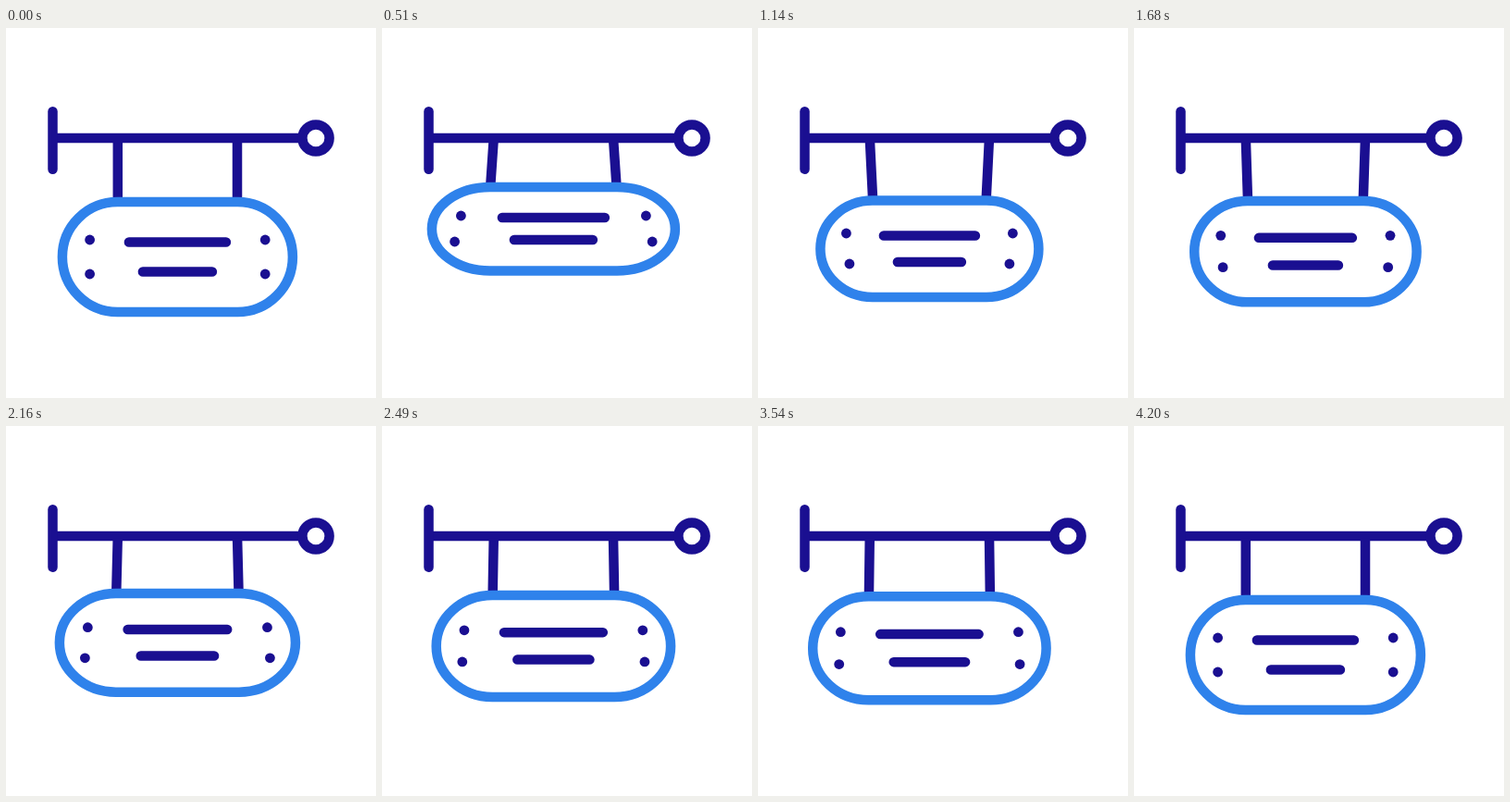
Write an HTML page that moves like this. It is 400 px wide and 400 px high and loops after 4.73 s.

```html
<!DOCTYPE html>
<html lang="en">
<head>
<meta charset="utf-8">
<title>Swinging sign</title>
<style>
  html, body { margin: 0; width: 100%; height: 100%; overflow: hidden; background: #fff; }
  svg { display: block; width: 100vw; height: 100vh; }
  .line { fill: none; stroke: #1a0f91; stroke-width: 10.5; }
  .round { stroke-linecap: round; }
  .dot { fill: #1a0f91; }
  .board { fill: none; stroke: #2f82eb; stroke-width: 10.5; }
</style>
</head>
<body>
<svg viewBox="0 0 400 400">
  <path id="hangers" class="line"/>
  <path class="line" d="M50.5 119H320"/>
  <path class="line round" d="M50.5 90.3V152.7"/>
  <circle class="line" cx="335" cy="119" r="14.6"/>
  <rect id="board" class="board"/>
  <path id="bars" class="line round"/>
  <g id="dots"></g>
</svg>
<script>
const LOOP = 4730, END = 4200, STEP = 30;
const CX = 185.4, BAR_Y = 119, HANG = 64.6;

// top, bottom, half width, then (half span, y) of upper dots, lower dots, long bar, short bar
const REST = [188, 307, 124.5, 94.8, 229, 94.8, 266, 52.5, 231.5, 37.5, 263.5];
const FRONT = [-16, -44.5, 7, 5.2, -26, 12, -35, 3, -26.5, 5, -34.5];
const BACK = [-1.5, -16, -6.5, -4.8, -7, -8.3, -11, -3, -7, -3, -10.5];
const BACK_SOFT = [-2, -9.5, -3, -2, -5, -3.3, -7, -1, -5, -0.8, -7];

// Each swing leaves rest, peaks and returns to rest
const SWINGS = [
  { from: 0, peak: 510, to: 950, pose: FRONT, amp: 1 },
  { from: 950, peak: 1375, to: 1800, pose: BACK, amp: 1.55 },
  { from: 1800, peak: 2300, to: 2650, pose: FRONT, amp: 0.48 },
  { from: 2650, peak: 2975, to: 3300, pose: BACK_SOFT, amp: 1.37 },
  { from: 3300, peak: 3640, to: END, pose: FRONT, amp: 0.27 }
];

const $ = id => document.getElementById(id);
const set = (el, attrs) => {
  for (const name in attrs) el.setAttribute(name, attrs[name]);
};

const dots = Array.from({ length: 4 }, () => {
  const dot = document.createElementNS("http://www.w3.org/2000/svg", "circle");
  set(dot, { class: "dot", r: 5.4 });
  return $("dots").appendChild(dot);
});

const quarter = p => Math.sin(p * Math.PI / 2);
const smooth = p => (1 - Math.cos(p * Math.PI)) / 2;

function poseAt(t) {
  const swing = SWINGS.find(s => t < s.to);
  if (!swing) return REST;
  const { from, peak, to, pose, amp } = swing;
  const rising = t < peak;
  const p = rising ? (t - from) / (peak - from) : (to - t) / (to - peak);
  // The very first and last moves ease at rest; the others pass through it at speed
  const soft = rising ? from === 0 : to === END;
  const k = amp * (soft ? smooth(p) : quarter(p));
  return REST.map((v, i) => v + k * pose[i]);
}

const bar = (half, y) => `M${CX - half} ${y}H${CX + half}`;

function draw(t) {
  const [top, bottom, half, d1, y1, d2, y2, b1, by1, b2, by2] = poseAt(t);
  const scale = half / REST[2];
  const low = HANG * scale;
  set($("hangers"), {
    d: [-1, 1].map(s => `M${CX + s * HANG} ${BAR_Y}L${CX + s * low} ${top}`).join("")
  });
  set($("board"), {
    x: CX - half, y: top, width: 2 * half, height: bottom - top,
    rx: 59.5 * scale, ry: (bottom - top) / 2
  });
  set($("bars"), { d: bar(b1, by1) + bar(b2, by2) });
  [[-d1, y1], [d1, y1], [-d2, y2], [d2, y2]].forEach(([x, y], i) =>
    set(dots[i], { cx: CX + x, cy: y }));
}

const start = performance.now();
function tick() {
  const t = Math.max(0, performance.now() - start) % LOOP;
  draw(Math.floor(t / STEP) * STEP);
  requestAnimationFrame(tick);
}
tick();
</script>
</body>
</html>
```
